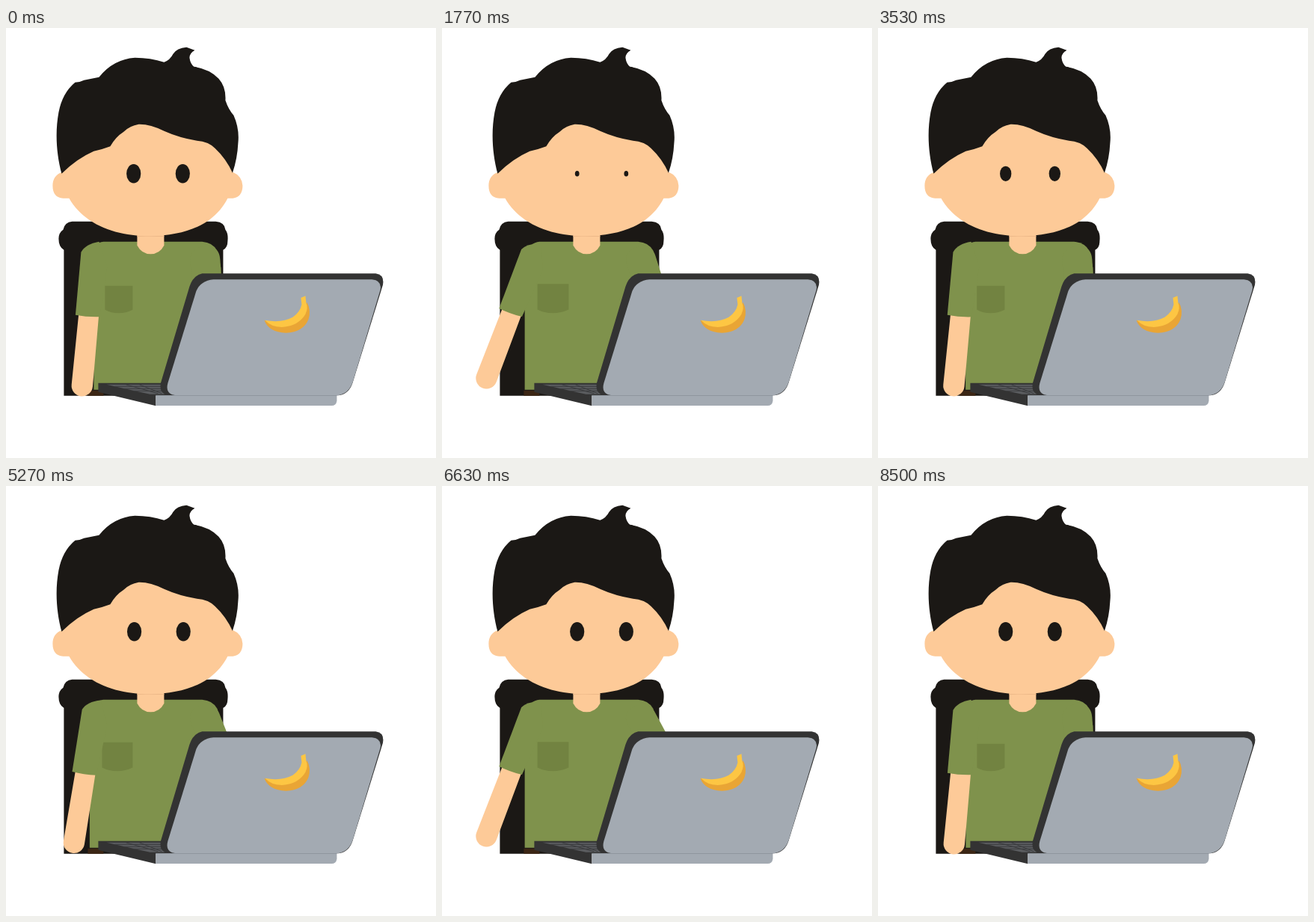
These frames come from a looping animation (575x575 px, 9.11 s). An HTML page:

```html
<!DOCTYPE html>
<html lang="en">
<head>
<meta charset="utf-8">
<title>At the laptop</title>
<style>
  html, body { margin: 0; width: 100%; height: 100%; overflow: hidden; background: #fff; }
  svg { display: block; width: 100%; height: 100%; }
  .ink { fill: #1b1815; }
  .skin { fill: #fdca98; }
  .shirt { fill: #7f924c; }
  .dark { fill: #333; }
  .metal { fill: #a3aab2; }
</style>
</head>
<body>
<svg viewBox="0 0 575 575">
<g transform="translate(0.4 0.8)">
  <g id="chair" class="ink">
    <path d="M88 258H280Q292 259 293 269Q297 274 296 284Q296 293 290 296V491H77V296Q70 292 70 281Q70 273 76 269Q78 259 88 258Z"/>
    <path d="M109 484H130V491H109Z" fill="#3c2615"/>
  </g>

  <g id="body">
    <g id="torso" class="shirt"><path d="M117 305H262V483H117Z"/></g>
    <path class="shirt" d="M112 301Q117 286 130 285H262Q276 286 282 297L287 320V345H112Z"/>
    <path id="pocket" d="M132 344H169V376Q160 380.500 150.500 380.500Q140 380.500 132 376Z" fill="#728341"/>
    <g id="rightArm">
      <rect class="skin" x="251" y="370" width="28" height="108" rx="14"/>
      <path class="shirt" d="M246 310Q246 291 266 291Q286 291 286 310V384H246Z"/>
    </g>
    <g id="leftArm">
      <path class="skin" d="M97 380L87.300 476A14 14 0 0 0 115.500 479L124 380Z"/>
      <path class="shirt" d="M100 299Q106 288 124 285L135 318L125 385.500Q108 386 92.500 383Z"/>
    </g>
  </g>

  <g id="head">
    <path class="skin" d="M175 270H211V290Q205 301.500 193 301.500Q181 301.500 175 290Z"/>
    <path d="M175 277.700H211" stroke="#edb989" stroke-width="1"/>
    <path class="skin" d="M74 192Q62 197 62 210Q62 226 76 227H84C104 262 146 277.500 192 277.500C241 276.500 278 262 296 227H303Q316 225 316 210Q315 197 303 192L270 120H110Z"/>
    <path class="ink" d="M74 194C67 168 65 139 70 112Q75 86 92 72Q98 72 104 69L124 65Q143 41 172 39Q193 39 211 45Q219 42 223 34Q228 26 241 25L252 29Q245 33 245 39Q246 47 251 51Q272 54 284 67Q294 78 293 96Q297 108 304 116Q312 134 310 153Q309 174 302.500 193Q294 174 279 160Q270 151 255 150Q231 146 211 137Q192 127.500 177 128Q165 130 157 138Q146 145 139 157.500Q127 162 117 164Q94 174 74 194Z"/>
    <g class="ink">
      <ellipse class="eye" cx="170.300" cy="194" rx="9.600" ry="12.700"/>
      <ellipse class="eye" cx="235.900" cy="194" rx="9.600" ry="12.700"/>
    </g>
  </g>

  <g id="laptop">
    <path class="dark" d="M123 474H212L222 491H200V504.500L123 486Z"/>
    <path d="M134 476H209L213 489H192Z" fill="#5a5c5f"/>
    <path d="M145 478.500H209M157 481.500H210M170 484.500H211M160 476L203 488M178 476L208 488" stroke="#3a3b3d" fill="none"/>
    <path class="dark" d="M262 327.500H494Q506 329 503.500 343L463 474Q458 489 444 490.500H216Q204 488 206.500 474L245 345Q250 330 262 327.500Z"/>
    <path class="metal" d="M277 335.500H489Q503 337 500 350L463.500 472Q458 489 442 490.500H227Q212 489 216 474L254 351Q260 337 277 335.500Z"/>
    <path class="metal" d="M200 490.500H442V498Q441 504.300 435 504.300H200Z"/>
    <path d="M200 490.700H442" stroke="#8f969e" stroke-width="1"/>
    <path d="M345 390Q370 402 388 389Q399 379 402 366Q408 377 404 389Q397 406 374 407Q351 406 345 390Z" fill="#e9a535"/>
    <path d="M394 360L400 357.500L401 367Q404 373 400 382Q391 397 371 399Q355 400 346 390Q368 394 383 386Q393 379 395 369Z" fill="#fdc643"/>
  </g>
</g>
</svg>
<script>
const LOOP = 9110, CYCLE = 4570, START = 500;

const sine = p => (1 - Math.cos(Math.PI * p)) / 2;
const out = p => 1 - (1 - p) ** 2;

// Keys are [ms, value, easing into this key].
function track(keys, t) {
  let prev = keys[0];
  if (t <= prev[0]) return prev[1];
  for (const key of keys) {
    if (t < key[0]) {
      const p = (key[2] || sine)((t - prev[0]) / (key[0] - prev[0]));
      return prev[1] + (key[1] - prev[1]) * p;
    }
    prev = key;
  }
  return prev[1];
}

const leftSwing = [[0, 0], [600, 15.6], [1835, 15.6], [3160, 0, out]];
const rightSwing = [[0, 4], [520, 58], [900, 58], [1420, 8], [1740, 58], [1980, 20], [2900, 4]];
const widen = [[0, 0], [350, 1, out], [2200, 1], [3160, 0]];
const gaze = [[0, 0], [1050, 10], [1880, 10], [2600, 0]];
const lid = [[0, 1], [50, 0.3], [90, 0.3], [140, 1]];
const blinks = [1200, 3013, 3280];

const $ = id => document.getElementById(id);
const eyes = [...document.querySelectorAll('.eye')].map(el => ({ el, x: +el.getAttribute('cx') }));
const set = (el, value) => el.setAttribute('transform', value);
const scaleAt = (x, y, sx, sy) =>
  `translate(${x} ${y}) scale(${sx} ${sy}) translate(${-x} ${-y})`;

function draw(ms) {
  const t = (ms % LOOP) % CYCLE - START;
  const w = track(widen, t);
  set($('torso'), scaleAt(169, 0, 1 + 0.13 * w, 1));
  set($('pocket'), scaleAt(169, 381, 1 + 0.13 * w, 1 + 0.07 * w));
  set($('leftArm'), `rotate(${track(leftSwing, t)} 116.7 318)`);
  set($('rightArm'), `rotate(${-track(rightSwing, t)} 266 310)`);

  const look = track(gaze, t);
  const open = Math.min(...blinks.map(b => track(lid, t - b)));
  for (const { el, x } of eyes) {
    set(el, `translate(${look} 0) ` + scaleAt(x, 194, open, open));
  }
}

const begin = performance.now();
function tick() {
  draw(performance.now() - begin);
  requestAnimationFrame(tick);
}
tick();
</script>
</body>
</html>
```
